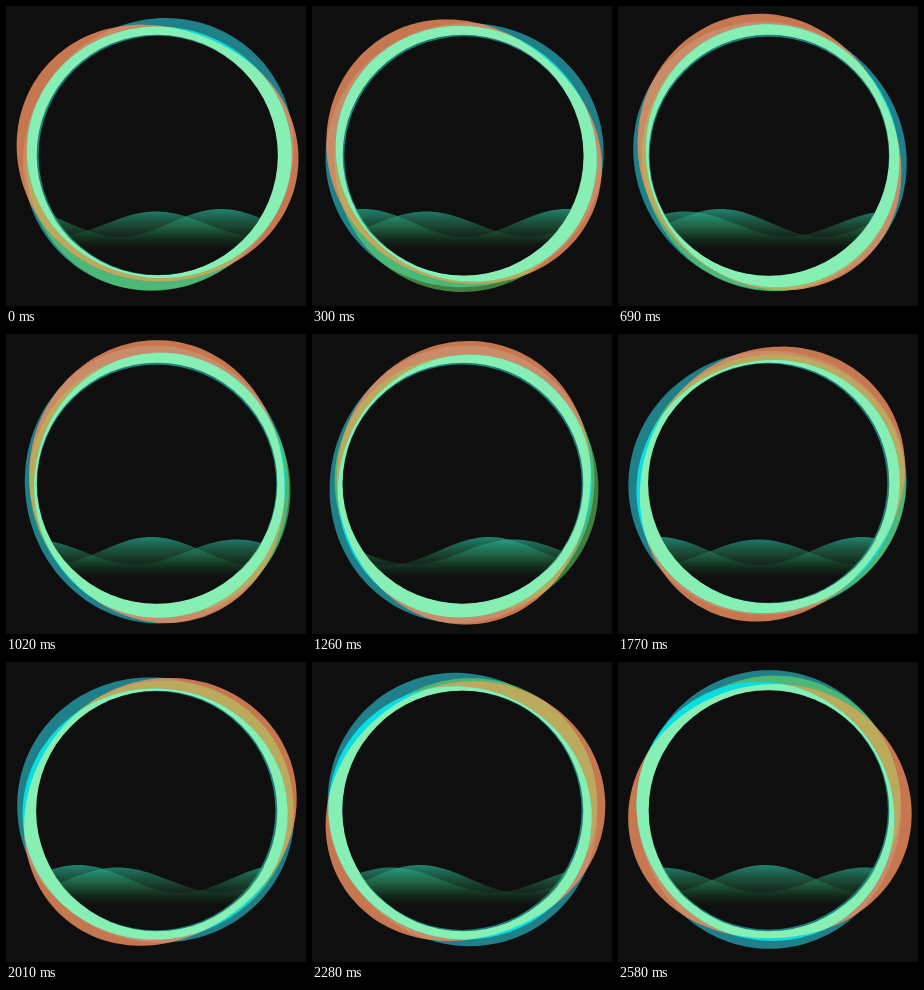
Recreate the animation shown at these times as an HTML page with a canvas. Size 300 by 300 pixels, loop 2610 ms.

```html
<!DOCTYPE html>
<html lang="en">
<head>
<meta charset="utf-8">
<title>Fluid ring</title>
<style>
  html, body { margin: 0; width: 100%; height: 100%; overflow: hidden; background: #0f0f0f; }
  canvas { display: block; width: 300px; height: 300px; }
</style>
</head>
<body>
<canvas id="stage" width="300" height="300"></canvas>
<script>
const ctx = document.getElementById('stage').getContext('2d');
const LOOP = 2610, STEP = 30;
const CX = 151, CY = 149, HOLE = 120;
const RAD = Math.PI / 180, TAU = Math.PI * 2;
const BG = '#0f0f0f';

// start and speed in degrees; harmonics are [cos, sin] amplitudes
const rings = {
  teal:   { start: -48, speed: 123, radius: 135.5, harmonics: [[1.5, 0.5], [3.8, 0]] },
  green:  { start: 115, speed: -68, radius: 130.5, harmonics: [[4, 0], [2.5, 0]] },
  orange: { start: 205, speed: 62, radius: 134.3, harmonics: [[1.5, 1.5], [7, -2.5], [0, 1.5]] },
  mint:   { start: 98, speed: 85, radius: 129, harmonics: [[-3, -2], [-3.5, 0]] }
};

const waves = [
  { crest: 150, speed: -120, mid: 218, amp: 12.5 },
  { crest: 215, speed: 131, mid: 217, amp: 14 }
];
const WAVELENGTH = 203;

const shade = ctx.createLinearGradient(0, 202, 0, 244);
shade.addColorStop(0, 'rgba(40,185,160,.7)');
shade.addColorStop(0.5, 'rgba(38,125,80,.42)');
shade.addColorStop(1, 'rgba(15,50,25,0)');

function ringPath(ring, t) {
  const turn = ring.start + ring.speed * t;
  const path = new Path2D();
  for (let deg = 0; deg < 360; deg += 2) {
    const a = (deg - turn) * RAD;
    const r = ring.harmonics.reduce((sum, [c, s], i) =>
      sum + c * Math.cos((i + 1) * a) + s * Math.sin((i + 1) * a), ring.radius);
    path.lineTo(CX + r * Math.cos(deg * RAD), CY + r * Math.sin(deg * RAD));
  }
  path.closePath();
  return path;
}

function disc(x, y, r) {
  const path = new Path2D();
  path.arc(x, y, r, 0, TAU);
  return path;
}

// Fills the area shared by all the given paths
function paint(color, ...paths) {
  ctx.save();
  paths.slice(1).forEach(p => ctx.clip(p));
  ctx.fillStyle = color;
  ctx.fill(paths[0]);
  ctx.restore();
}

function drawRings(t) {
  const teal = ringPath(rings.teal, t);
  const green = ringPath(rings.green, t);
  const orange = ringPath(rings.orange, t);
  const mint = ringPath(rings.mint, t);

  paint('#20808a', teal);
  paint('#3f7f40', green);
  paint('#4bb878', green, teal);
  paint('#c77750', orange);
  paint('#c98b68', orange, teal);
  paint('#bcaa5c', orange, green);
  paint('#08dfe2', mint);
  paint('#88efb4', mint, orange);
}

// The opening sways a little and uncovers a dark inner rim
function drawHole(t) {
  const sway = (20 + rings.mint.speed * t) * RAD;
  paint('#1d7d78', disc(CX, CY, HOLE + 0.3));
  paint(BG, disc(CX + 1.3 * Math.cos(sway), CY + 1.3 * Math.sin(sway), HOLE - 0.4));
}

function drawWaves(t) {
  const bounds = disc(CX, CY, HOLE + 1);
  for (const w of waves) {
    const crest = w.crest + w.speed * t;
    const path = new Path2D();
    path.moveTo(28, 246);
    for (let x = 28; x <= 274; x += 2) {
      path.lineTo(x, w.mid - w.amp * Math.cos((x - crest) / WAVELENGTH * TAU));
    }
    path.lineTo(274, 246);
    path.closePath();
    paint(shade, path, bounds);
  }
}

function draw(now) {
  const t = Math.floor((now % LOOP) / STEP) * STEP / 1000;
  ctx.fillStyle = BG;
  ctx.fillRect(0, 0, 300, 300);
  drawRings(t);
  drawHole(t);
  drawWaves(t);
}

let begin;
function tick(now) {
  begin ??= now;
  draw(now - begin);
  requestAnimationFrame(tick);
}
draw(0);
requestAnimationFrame(tick);
</script>
</body>
</html>
```
